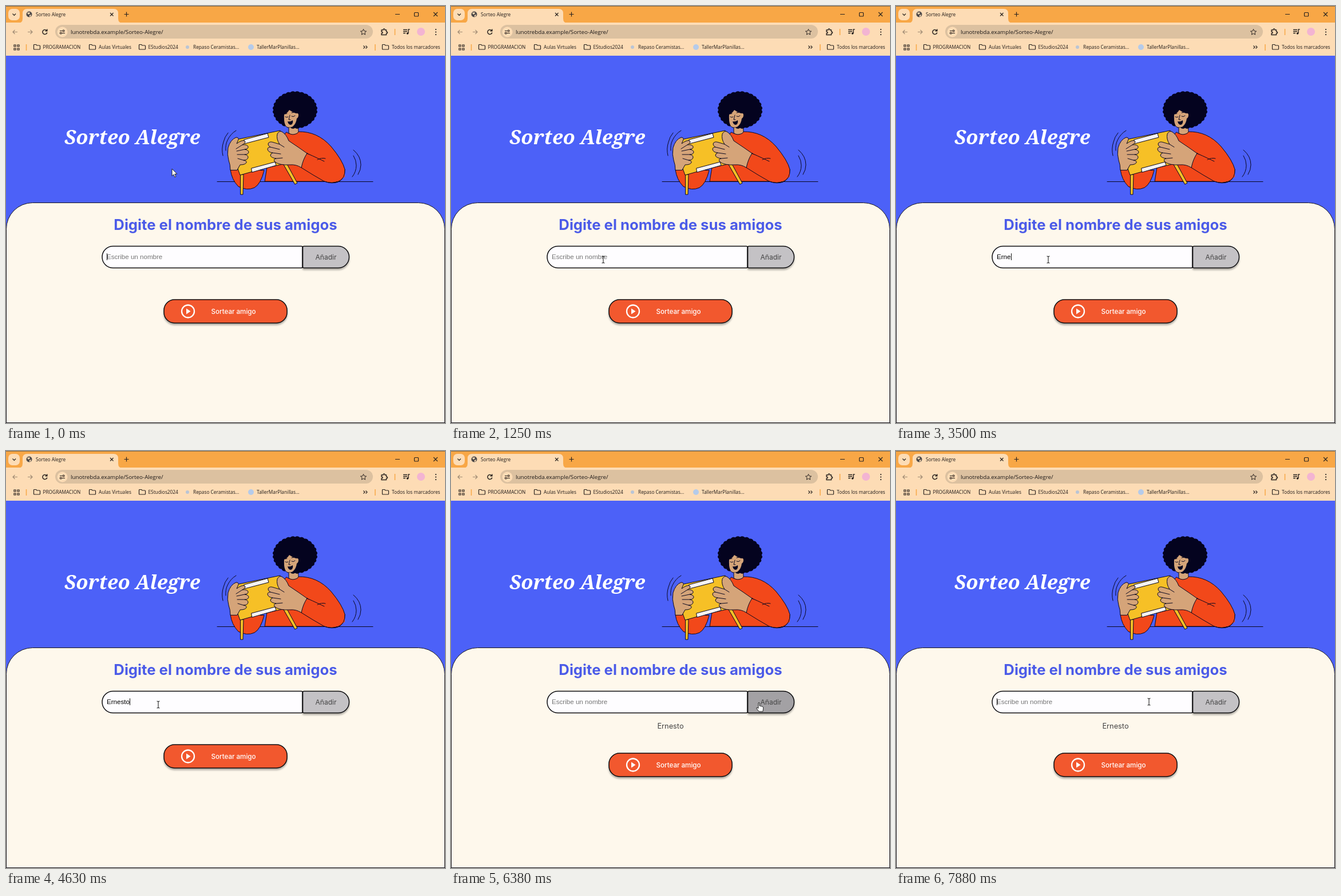
Animation of 767x730 px, one loop 8 s. Source, as an HTML page:

```html
<!DOCTYPE html>
<html lang="es">
<head>
<meta charset="utf-8">
<title>Sorteo Alegre</title>
<style>
  html, body { margin: 0; width: 100%; height: 100%; overflow: hidden; background: #fef8ec; }
  svg { display: block; }
  .ui { font: 8.3px "Open Sans", sans-serif; fill: #1f1a18; }
  .in { font: 11.6px "Liberation Sans", Arial, sans-serif; }
  .inter { font-family: Inter, sans-serif; }
  .ln { fill: none; stroke: #2b2420; stroke-width: 1.2; }
  .art { stroke: #0a0820; stroke-width: 1; stroke-linejoin: round; stroke-linecap: round; }
  .skin { fill: #d5a479; }
  .red { fill: #f2481a; }
  .gold { fill: #f6c026; }
  .none { fill: none; }
</style>
</head>
<body>
<svg width="767" height="730" viewBox="0 0 767 730">
  <defs>
    <filter id="shade" x="-10%" y="-20%" width="120%" height="160%">
      <feDropShadow dx="0" dy="3" stdDeviation="1.6" flood-opacity=".3"/>
    </filter>
    <path id="folder" class="ln" d="M.5 1.5q0-1 1-1h3l1.500 1.500h4.500q1 0 1 1v5q0 1-1 1h-9q-1 0-1-1z"/>
  </defs>

  <!-- browser frame -->
  <rect width="767" height="30" fill="#f8a746"/>
  <rect width="767" height="1" fill="#8d6a3c"/>
  <rect y="29" width="767" height="58" fill="#fddcb5"/>
  <path d="M21 30q8 0 8-8v-9q0-8 8-8h151q8 0 8 8v9q0 8 8 8z" fill="#fddcb5"/>
  <rect x="4" y="5" width="20" height="20" rx="7" fill="#fddcb5"/>
  <path class="ln" d="M11.500 13.500l2.800 2.800 2.800-2.800M182 12l5.500 5.500M187.500 12l-5.500 5.500M206.500 14.500h8M210.500 10.500v8M680 14.500h8M747 11l7 7M754 11l-7 7"/>
  <rect class="ln" x="713.500" y="11.500" width="7" height="6.500" rx="1"/>
  <circle cx="40.500" cy="14.500" r="5" fill="#4e4a4a"/>
  <path d="M37 12l4-1 1 2-3 2zM41 16l3-1-1 3-2 1z" fill="#fddcb5"/>
  <text class="ui" x="52" y="18">Sorteo Alegre</text>

  <path class="ln" d="M20 45.500h-8M15.500 42l-3.500 3.500 3.500 3.500M38 45.500h8M42.500 42l3.500 3.500-3.500 3.500" style="stroke:#a08b74"/>
  <path class="ln" d="M71 43a4 4 0 1 0 .8 3.500M71.800 40.500v3.200h-3.200" style="stroke-width:1.500"/>
  <rect x="86" y="33" width="555" height="24" rx="12" fill="#dcc1a0"/>
  <circle cx="98.500" cy="45.500" r="9" fill="#fddcb5"/>
  <path class="ln" d="M94 43.500h4M98 47.500h5"/>
  <circle class="ln" cx="100.500" cy="43.500" r="1.500"/><circle class="ln" cx="95.800" cy="47.500" r="1.500"/>
  <text class="ui" x="113" y="49" style="font-size:9.800px">lunotrebda.example/Sorteo-Alegre/</text>
  <path class="ln" d="M624.500 40.500l1.500 3.300 3.600.4-2.700 2.400.8 3.500-3.200-1.800-3.200 1.800.8-3.500-2.700-2.400 3.600-.4z" style="stroke-width:1"/>
  <path class="ln" d="M656 42h3q0-2 1.500-2t1.500 2h2.500v3q2 0 2 1.500t-2 1.500v2.500h-8.500v-2.500q2 0 2-1.500t-2-1.500z" style="stroke-width:1.400"/>
  <path d="M679.500 40v11M645 67v11M35.500 67v11" stroke="#f8a746" stroke-width="1.500"/>
  <path class="ln" d="M694 41.500h7M694 44.500h7M694 47.500h4M703 48v-7h2.500" style="stroke-width:1.400"/>
  <circle cx="701.500" cy="48" r="1.800" fill="#2b2420"/>
  <circle cx="725" cy="45" r="7" fill="#f3b4d2"/>
  <path d="M751 41v.1M751 45.500v.1M751 50v.1" stroke="#2b2420" stroke-width="2.200" stroke-linecap="round"/>

  <path class="ln" d="M14 68h3v3h-3zM20 68h3v3h-3zM14 74h3v3h-3zM20 74h3v3h-3z"/>
  <use href="#folder" x="48" y="67"/><use href="#folder" x="145" y="67"/>
  <use href="#folder" x="232" y="67"/><use href="#folder" x="657" y="67"/>
  <g class="ui">
    <text x="64.500" y="75">PROGRAMACION</text>
    <text x="162" y="75">Aulas Virtuales</text>
    <text x="248.500" y="75">EStudios2024</text>
    <text x="327" y="75">Repaso Ceramistas...</text>
    <text x="438" y="75">TallerMarPlanillas...</text>
    <text x="674" y="75">Todos los marcadores</text>
  </g>
  <circle cx="317" cy="72" r="3" fill="#b9c5d6"/>
  <circle cx="428" cy="72" r="5" fill="#b5cbea"/>
  <path class="ln" d="M624.500 69.500l2.500 2.500-2.500 2.500M628.500 69.500l2.500 2.500-2.500 2.500"/>

  <!-- page -->
  <rect y="87" width="767" height="330" fill="#4c61f8"/>
  <text x="102" y="242" fill="#fff" style="font:italic 700 34.500px 'Noto Serif',serif">Sorteo Alegre</text>

  <g class="art">
    <path class="none" d="M369 307.500h272M379 262q-3-12 1-24 2-9 8-16M384 253q-1-10 3-18 5-11 15-17M607 262q5 8 5 17 0 11-7 20M607 252q13 11 13 26 0 9-5 17"/>
    <path class="red" d="M490 221q10 7 20-1 34-1 58 26 20 24 24 40 1 16-12 22-8 3-24-1H452l8-50z"/>
    <path class="red" d="M392 286q2 18 14 30 15 8 28 2 11-6 17-30z"/>
    <path class="skin" d="M494 206v14q-1 4 7 5 9-1 10-5l-1-18z"/>
    <path id="hair" fill="#04031f" stroke="none"/>
    <path class="skin" stroke="none" d="M486 190q5-2 9-8 5 4 12 6 4-1 4 3 0 4-3 6-1 9-7 14-6 3-11 0-5-4-4-21z"/>
    <path class="none" d="M488 194q3 2 5 0M499 193q3 2 6-1M496 191l-2 8h3M488 189l3-1M499 187l4-1"/>
    <path fill="#04031f" stroke="none" d="M492 202q5 1 9-2 1 5-2 7.500-5 2-7-5.500z"/>
    <path class="gold" d="M410 295h5l-1 35h-4zM485 277l5-2 19 35-4 2z"/>
    <path class="gold" d="M397 235l82-17q12 27 14 57-40 8-84 21-12-28-12-61z"/>
    <path fill="#f6f3f2" d="M416 234l41-11 2 7-42 11zM429 284l41-11 2 6-42 12z"/>
    <path class="skin" d="M392 287q0-9-3-17-3-10-1-22 4-14 14-18 5 0 4 4l-3 7q9-7 14-5 3 3-4 7 8-1 10 3 1 4-6 5 7 1 7 5-1 4-7 4 6 1 6 5-1 5-8 5 6 1 5 4-2 4-11 4l-5 9z"/>
    <path class="none" d="M413 243l-11 7M417 251l-14 3M417 260h-13M415 270l-10-3"/>
    <path class="skin" d="M526 258l-10 25q-9-6-20-5-18 1-26-5-4-5 2-6-8-1-10-5 0-4 4-5-8-1-9-6 0-4 5-4-5-3-4-6 2-5 10-2l10 3q-6-9-4-18 3-6 8-4 8 5 12 16 18 12 32 22z"/>
    <path class="none" d="M462 247l16 4M466 257l14 2M472 267l11-1M478 242l8 5"/>
    <path class="red" d="M526 258q-7 10-10 25 22 14 40 24 14 5 26-1-10-22-56-48z"/>
    <path class="red" stroke="none" d="M528 259l28 13 13-3q14 9 23 17v13l-12 8-18-5z"/>
    <path class="none" d="M544 269q8-4 14-2M526 258q20 9 30 14"/>
    <path class="none" d="M556 307q14 5 24 1 13-6 12-22"/>
  </g>

  <path d="M.5 740V390.500a46 46 0 0 1 46-46h674a46 46 0 0 1 46 46V740" fill="#fef8ec" stroke="#15131c"/>
  <path d="M0 729.500h767" stroke="#15131c"/>
  <text class="inter" x="383.500" y="391.500" text-anchor="middle" fill="#4b5be8" font-size="25.700" font-weight="700">Digite el nombre de sus amigos</text>

  <path d="M187 420.500h329q2 0 2 2v34q0 2-2 2H187a19 19 0 0 1 0-38z" fill="#fefdff" stroke="#0b0b0f" stroke-width="1.500"/>
  <path id="add" d="M520.500 420.500h60a19 19 0 0 1 0 38h-60q-2 0-2-2v-34q0-2 2-2z" stroke="#0b0b0f" stroke-width="1.500" filter="url(#shade)"/>
  <text class="inter" x="559" y="444" text-anchor="middle" fill="#444" font-size="12">Añadir</text>
  <text id="field" class="in" x="176" y="443"></text>
  <path id="caret" d="M0 433v12" stroke="#111"/>
  <text id="entry" class="inter" x="383.500" y="486" text-anchor="middle" fill="#444" font-size="12.800">Ernesto</text>

  <g id="draw">
    <rect x="276" y="514" width="215" height="41" rx="18.500" fill="#f2592d" stroke="#0b0b0f" stroke-width="1.500" filter="url(#shade)"/>
    <circle cx="318" cy="534.500" r="11" fill="none" stroke="#fff" stroke-width="2.300"/>
    <path d="M315 529.500v10l7.500-5z" fill="#fff"/>
    <text class="inter" x="397.500" y="539" text-anchor="middle" fill="#fff" font-size="11.600" font-weight="500">Sortear amigo</text>
  </g>

  <g id="arrow"><path d="M0 0v12.500l2.800-2.600 2 4.600 2-.9-2-4.500h4z" fill="#fff" stroke="#111" stroke-width=".9"/></g>
  <g id="beam"><path d="M-2.500-6q2 0 2.500 1 .5-1 2.500-1M0-5v10M-2.500 6q2 0 2.500-1 .5 1 2.500 1" fill="none" stroke="#222" stroke-width="1.100"/></g>
  <g id="hand"><path d="M-1 0q1-1.500 2 0v5l5 1.200q2 .6 1.600 3L7 15H0l-4-5q-.8-1.700 1-1.800l2 1.300z" fill="#fff" stroke="#111" stroke-width=".9"/></g>
</svg>
<script>
const $ = id => document.getElementById(id);
const LOOP = 8000, STEP = 125, BLINK = 530;
const NAME = "Ernesto", HINT = "Escribe un nombre";
const keyTimes = [2750, 3000, 3250, 3375, 3875, 4125, 4375];
const ADDED = 6125, FOCUSED = 7625;

// pointer: time, x, y
const stops = [
  [0, 290, 285], [125, 290, 285], [1000, 266, 444], [4750, 266, 444],
  [5625, 538, 441], [6750, 538, 441], [7500, 442, 439], [LOOP, 442, 439]
];
const zones = [
  ["beam", 168, 420, 518, 459], ["hand", 518, 420, 600, 459], ["beam", 186, 368, 580, 398]
];

// curly hair outline
let d = "";
for (let i = 0; i < 240; i++) {
  const a = i / 240 * Math.PI * 2, k = 1 + .045 * Math.abs(Math.sin(a * 14));
  d += (i ? "L" : "M") + (505 + 37.500 * k * Math.cos(a)).toFixed(1) + " " + (182 + 31.500 * k * Math.sin(a)).toFixed(1);
}
$("hair").setAttribute("d", d + "z");

const show = (id, on) => { $(id).style.display = on ? "" : "none"; };

function pointer(t) {
  const i = Math.max(1, stops.findIndex(s => s[0] > t));
  const [t0, x0, y0] = stops[i - 1], [t1, x1, y1] = stops[i];
  const p = (t - t0) / (t1 - t0), e = p * p * (3 - 2 * p);
  return [x0 + (x1 - x0) * e, y0 + (y1 - y0) * e];
}

function caretOn(t) {
  if (t >= ADDED - STEP && t < FOCUSED) return false;
  if (t >= FOCUSED) return t - FOCUSED < BLINK;
  const last = keyTimes.filter(k => k <= t).pop();
  const since = last === undefined ? t + 425 : t - last;
  return Math.floor(since / BLINK) % 2 === 0;
}

function render(now) {
  const t = Math.floor((now % LOOP) / STEP) * STEP;
  const added = t >= ADDED;
  const typed = added ? "" : NAME.slice(0, keyTimes.filter(k => k <= t).length);

  const field = $("field");
  const text = typed || HINT;
  if (field.textContent !== text) field.textContent = text;
  field.setAttribute("fill", typed ? "#000" : "#757575");
  const end = typed ? field.getComputedTextLength() : 0;
  $("caret").setAttribute("transform", `translate(${Math.round(176 + end) + .5})`);
  show("caret", caretOn(t));

  show("entry", added);
  $("draw").setAttribute("transform", `translate(0 ${added ? 15 : 0})`);

  const [x, y] = pointer(t);
  const zone = zones.find(([, l, u, r, b]) => x >= l && x < r && y >= u && y < b);
  const kind = zone ? zone[0] : "arrow";
  for (const id of ["arrow", "beam", "hand"]) show(id, id === kind);
  $(kind).setAttribute("transform", `translate(${x.toFixed(1)} ${y.toFixed(1)})`);
  $("add").setAttribute("fill", kind === "hand" ? "#a3a1a4" : "#c4c2c5");
}

function tick() {
  render(performance.now());
  requestAnimationFrame(tick);
}
tick();
</script>
</body>
</html>
```
